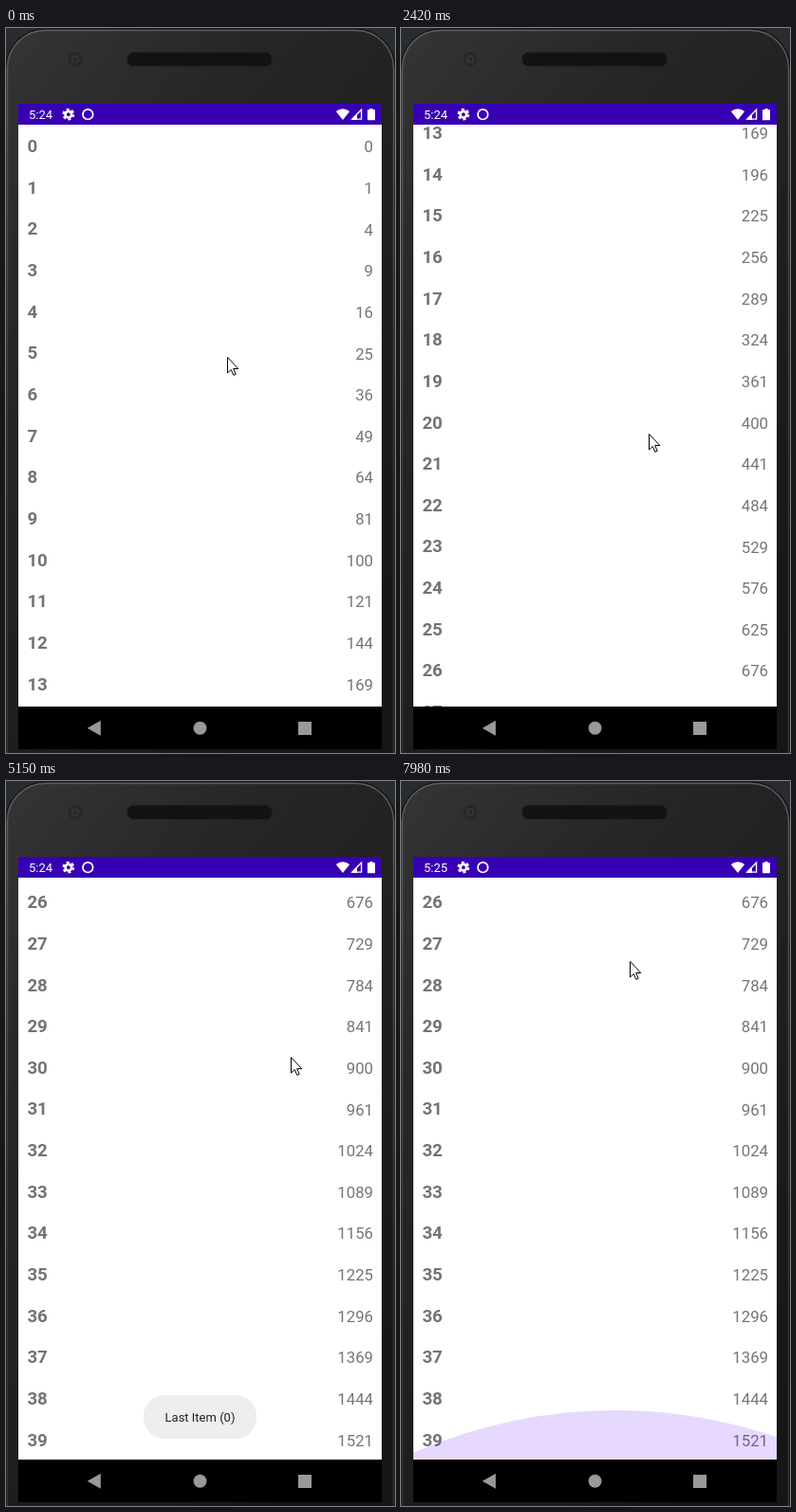
Write an HTML page that moves like this. It is 410 px wide and 765 px high and loops after 8000 ms.

```html
<!DOCTYPE html>
<html lang="en">
<head>
<meta charset="utf-8">
<title>Scrolling list of squares</title>
<style>
  html, body { margin: 0; width: 100%; height: 100%; overflow: hidden; background: #282b2f; }
  svg { display: block; width: 410px; height: 765px; font-family: Roboto, sans-serif; }
  .label { font-size: 18.66px; font-weight: bold; fill: #737373; }
  .square { font-size: 16.8px; text-anchor: end; fill: #757575; }
</style>
</head>
<body>
<svg viewBox="0 0 410 765">
  <defs>
    <linearGradient id="shell" x1="0" y1="0" x2=".6" y2="1">
      <stop offset="0" stop-color="#353535"/>
      <stop offset=".3" stop-color="#262626"/>
      <stop offset="1" stop-color="#161616"/>
    </linearGradient>
    <linearGradient id="rim" x1="0" y1="0" x2="0" y2="1">
      <stop offset="0" stop-color="#5c5c5c"/>
      <stop offset=".6" stop-color="#333"/>
    </linearGradient>
    <pattern id="mesh" width="4" height="4" patternUnits="userSpaceOnUse">
      <rect width="4" height="4" fill="#0e0e0e"/>
      <circle cx="1" cy="1" r=".8" fill="#202020"/>
      <circle cx="3" cy="3" r=".8" fill="#202020"/>
    </pattern>
    <clipPath id="screen"><rect x="13" y="102" width="383" height="614"/></clipPath>
  </defs>

  <rect x="-.5" y="1" width="411" height="850" rx="42" fill="url(#shell)" stroke="#0e0e0e"/>
  <rect x="1.5" y="2.5" width="407" height="850" rx="40" fill="none" stroke="url(#rim)" stroke-width="1.4"/>
  <rect x="128" y="26" width="152" height="14" rx="6" fill="url(#mesh)" stroke="#181818"/>
  <circle cx="73" cy="33" r="7.5" fill="#272727"/>
  <circle cx="73" cy="33" r="4.5" fill="#313335"/>
  <circle cx="73" cy="33" r="2" fill="#26282a"/>

  <rect x="13" y="80" width="383" height="22" fill="#3700b3"/>
  <g fill="#fff">
    <text id="clock" x="24" y="96" font-size="13">5:24</text>
    <circle cx="65.8" cy="91.2" r="5.2" fill="none" stroke="#fff" stroke-width="2.4" stroke-dasharray="2.9 2.545"/>
    <circle cx="65.8" cy="91.2" r="3.3" fill="none" stroke="#fff" stroke-width="2.6"/>
    <circle cx="86.3" cy="91.2" r="5.3" fill="none" stroke="#fff" stroke-width="1.7"/>
    <path d="M355 97 347.8 88Q355 82.6 362.2 88Z"/>
    <path d="M364.8 96.2H374.6V86.2Z" fill="none" stroke="#fff" stroke-width="1.3"/>
    <path d="M364 97 370 91V97Z"/>
    <path d="M381 86.3H383.4V85H386.6V86.3H389V97.2H381Z"/>
  </g>

  <rect x="13" y="102" width="383" height="614" fill="#fff"/>
  <g clip-path="url(#screen)">
    <g id="list"></g>
    <ellipse id="glow" cx="226" rx="528" fill="#6200ee"/>
  </g>
  <g id="toast">
    <rect x="145" y="648" width="119" height="46" rx="22" fill="#eee"/>
    <text x="204.5" y="676.4" font-size="13" text-anchor="middle" fill="#222">Last Item (0)</text>
  </g>

  <rect x="13" y="716" width="383" height="45" fill="#000"/>
  <g fill="#999">
    <path d="M85.7 738.8 99.8 730.8V746.8Z"/>
    <circle cx="204.5" cy="738.8" r="7"/>
    <rect x="308" y="732" width="14" height="14"/>
  </g>

  <g id="cursor">
    <path d="M.5 .5V17L4.3 13.5 6.8 19.3 9.2 18.3 6.7 12.5H11.8Z" fill="#fff" stroke="#000"/>
    <circle id="touch" r="12" fill="#ff0" opacity=".5"/>
  </g>
</svg>
<script>
const LOOP = 8000, STEP = 68.6, ROW = 43.64, ROWS = 40, BOTTOM = ROW * ROWS - 614;
const PAUSE = 130, GLIDE = 1300; // rest before each pointer move, length of a swipe's scroll
const PULL_START = 6830, PULL_Y = 501;
const [clock, list, glow, toast, cursor, touch] =
  ['clock', 'list', 'glow', 'toast', 'cursor', 'touch'].map(id => document.getElementById(id));

for (let n = 0; n < ROWS; n++) {
  list.innerHTML += `<text class="label" x="22.4" y="${131.2 + n * ROW}">${n}</text>
    <text class="square" x="387" y="${131.3 + n * ROW}">${n * n}</text>`;
}

// Pointer arrivals; a swipe holds the button and throws the list, a press only holds
const stops = [
  { t: 100, x: 233, y: 347 },
  { t: 920, x: 223, y: 408 },
  { t: 1470, x: 229, y: 237, swipe: 581.5 },
  { t: 2421, x: 261, y: 428 },
  { t: 2950, x: 274, y: 245, swipe: 350.8 },
  { t: 3720, x: 289, y: 480 },
  { t: 4215, x: 300, y: 228, swipe: 700 },
  { t: 4960, x: 300, y: 291 },
  { t: 5500, x: 289, y: 458 },
  { t: 6330, x: 265, y: PULL_Y },
  { t: PULL_START - PAUSE, x: 265, y: PULL_Y },
  { t: 7240, x: 262, y: 610, press: true },
  { t: 7900, x: 241, y: 190, press: true },
  { t: LOOP, x: 241, y: 190 }
];
stops.forEach((stop, i) => stop.start = i ? stops[i - 1].t + PAUSE : 0);

const progress = (t, a, b) => Math.min(1, Math.max(0, (t - a) / (b - a)));
const smooth = u => u * u * (3 - 2 * u);
const glide = u => 1 - (1 - u ** 1.5) ** 1.442;

function pointerAt(t) {
  const i = Math.max(1, stops.findIndex(stop => t <= stop.t));
  const from = stops[i - 1], to = stops[i];
  const u = smooth(progress(t, to.start, to.t));
  return {
    x: from.x + (to.x - from.x) * u,
    y: from.y + (to.y - from.y) * u,
    held: t >= to.start && Boolean(to.swipe || to.press)
  };
}

function scrollAt(t, y) {
  if (t > PULL_START) return BOTTOM - Math.max(0, y - PULL_Y);
  const thrown = stops.filter(stop => stop.swipe).reduce((sum, { start, swipe }) =>
    sum + swipe * glide(progress(t, start, start + GLIDE)), 0);
  return Math.min(BOTTOM, thrown);
}

function draw(t) {
  const { x, y, held } = pointerAt(t);
  cursor.setAttribute('transform', `translate(${x} ${y})`);
  touch.style.display = held ? '' : 'none';
  list.setAttribute('transform', `translate(0 ${-scrollAt(t, y)})`);
  toast.setAttribute('opacity', progress(t, 4350, 4850) - progress(t, 6530, 7000));
  clock.textContent = t < 7050 ? '5:24' : '5:25';

  const pull = t > PULL_START ? progress(y, PULL_Y, 190) : 0;
  const height = 1 - (1 - pull) ** 2;
  glow.setAttribute('ry', 528 * height);
  glow.setAttribute('cy', 716 + 476 * height);
  glow.setAttribute('opacity', .15 * Math.min(1, pull * 2));
}

function tick() {
  const t = performance.now() % LOOP;
  // The screen refreshes in even steps
  draw(Math.max(0, Math.floor((t - 12) / STEP) * STEP + 20));
  requestAnimationFrame(tick);
}
tick();
</script>
</body>
</html>
```
